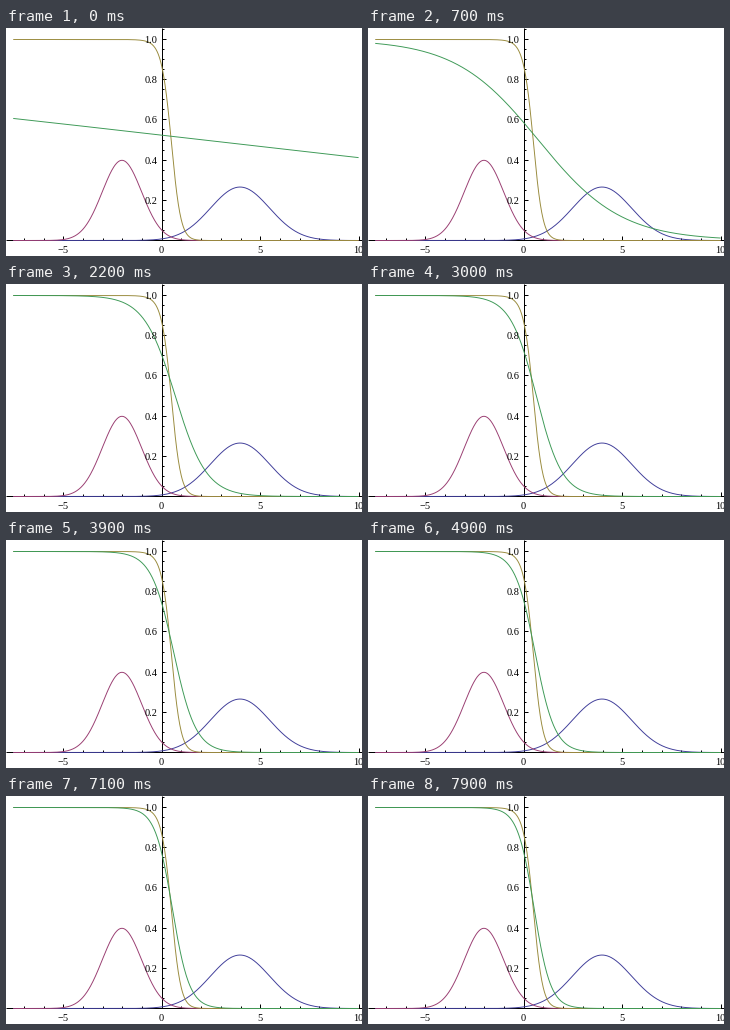
Recreate the animation shown at these times as a matplotlib script. Size 356 px wide and 228 px high, loop 8 s.

```python
import numpy as np
import matplotlib.pyplot as plt
from matplotlib.animation import FuncAnimation

W, H, DPI = 356, 228, 100
FRAMES, INTERVAL = 80, 100
X0, Y0 = 155.3, 212.5          # pixel position of the plot's zero point
XS, YS = 19.68, 201.0          # pixels per unit
PX = 72 / DPI                  # one pixel in points

BLUE, RED = (.247, .24, .6), (.6, .24, .443)
OLIVE, GREEN = (.6, .547, .24), (.24, .6, .337)

# The small margin keeps the size from rounding down a pixel
fig = plt.figure(figsize=((W + .01) / DPI, (H + .01) / DPI), dpi=DPI,
                 facecolor="white")
ax = fig.add_axes([0, 0, 1, 1])
ax.set_xlim(0, W)
ax.set_ylim(H, 0)
ax.axis("off")


def px(x):
    return X0 + XS * x


def py(y):
    return Y0 - YS * y


def rule(xs, ys):
    ax.plot(xs, ys, color="black", lw=PX, solid_capstyle="butt", zorder=1)


def label(x, y, text, ha):
    ax.text(x, y, text, ha=ha, va="center_baseline", color="black",
            family="Liberation Serif", size=10.4 * PX)


def curve(y, color):
    return ax.plot(px(x), py(y), color=color, lw=0.95 * PX, zorder=2)[0]


def normal(x, mean, sd):
    return np.exp(-((x - mean) / sd) ** 2 / 2) / (sd * np.sqrt(2 * np.pi))


def hermite(t, ts, vs):
    """Smooth interpolation through a few key values."""
    slopes = np.gradient(vs, ts)
    i = min(np.searchsorted(ts, t, side="right") - 1, len(ts) - 2)
    h = ts[i + 1] - ts[i]
    u = (t - ts[i]) / h
    return ((1 + 2 * u) * (1 - u) ** 2 * vs[i] + u * (1 - u) ** 2 * h * slopes[i]
            + u * u * (3 - 2 * u) * vs[i + 1] + u * u * (u - 1) * h * slopes[i + 1])


# Axes, ticks and labels
rule([0, W], [Y0, Y0])
rule([155.5, 155.5], [0, Y0])
for n in range(-7, 11):
    c = np.floor(px(n)) + .5
    rule([c, c], [Y0, Y0 - (4 if n % 5 == 0 else 2.5)])
for n in range(1, 22):
    c = np.floor(py(n / 20)) + .5
    rule([155.5, 155.5 + (4 if n % 4 == 0 else 2.5)], [c, c])
for n in (-5, 0, 5, 10):
    label(px(n), 221.5, str(n).replace("-", "\u2212"), "center")
for n in range(1, 6):
    label(151.5, py(n / 5), f"{n / 5:.1f}", "right")

# Two class densities, their exact posterior and the fitted logistic
x = np.linspace(-7.5, 10, 700)
right, left = normal(x, 4, 1.5), normal(x, -2, 1)
curve(right, BLUE)
curve(left, RED)
curve(left / (left + right), OLIVE)
fit = curve(0 * x, GREEN)

STEPS = [0, 7, 15, 30, 49, 62, 79]
BIAS = [.097, .36, .72, 1.0, 1.17, 1.24, 1.30]
SLOPE = [.045, .474, .96, 1.51, 1.97, 2.18, 2.38]


def update(step):
    bias, slope = hermite(step, STEPS, BIAS), hermite(step, STEPS, SLOPE)
    fit.set_ydata(py(1 / (1 + np.exp(slope * x - bias))))
    return fit,


anim = FuncAnimation(fig, update, frames=FRAMES, interval=INTERVAL,
                     repeat=True, repeat_delay=0, init_func=lambda: update(0))
plt.show()
```
